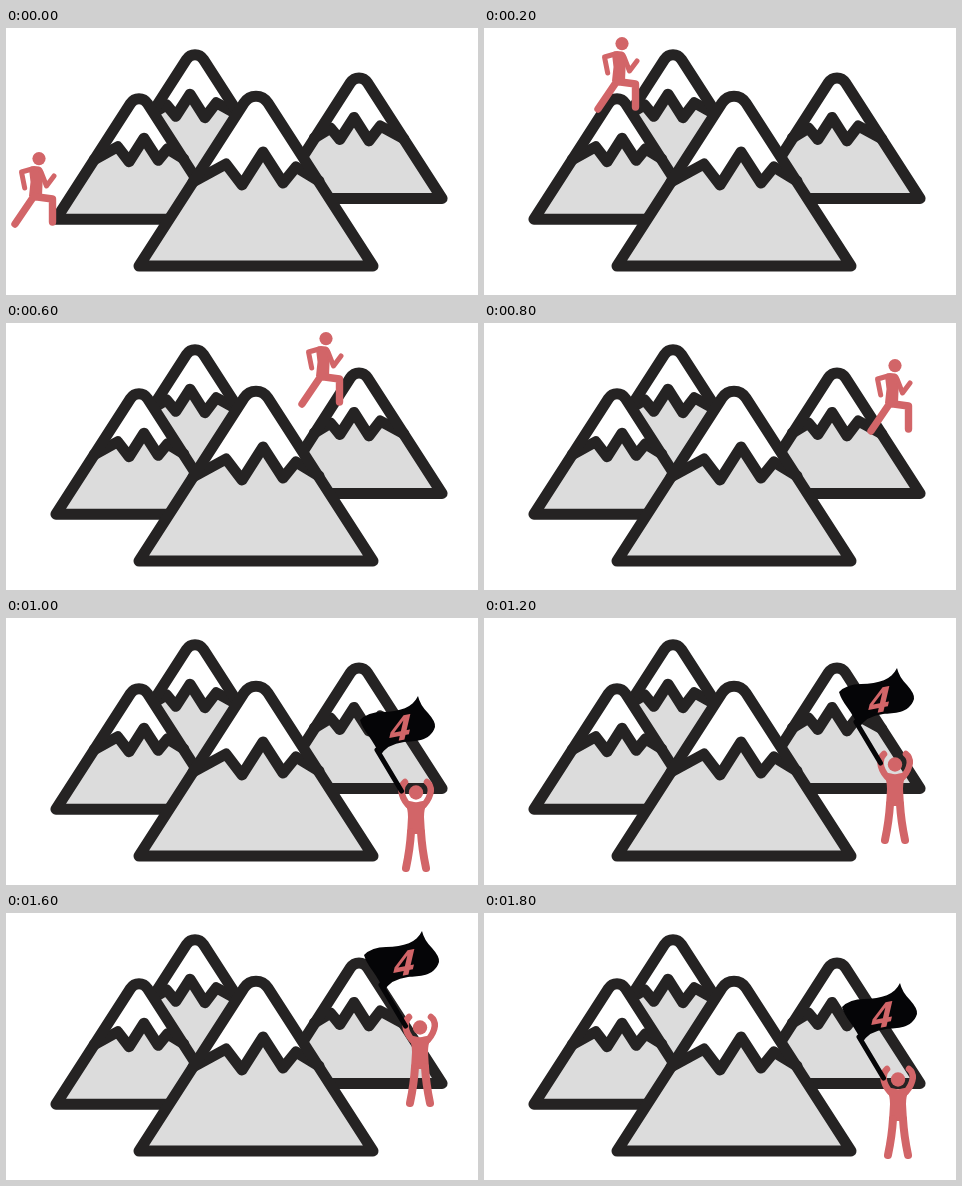
Write an HTML page that moves like this. It is 472 px wide and 267 px high and loops after 2 s.

```html
<!DOCTYPE html>
<html lang="en">
<head>
<meta charset="utf-8">
<title>Over the mountains</title>
<style>
  html, body { margin: 0; width: 100%; height: 100%; overflow: hidden; background: #fff; }
  svg { display: block; width: 100%; height: 100%; }
  .range { stroke: #252323; stroke-linejoin: round; stroke-linecap: round; fill: none; }
  .snow { fill: #fff; stroke: none; }
  .rock { fill: #dcdcdc; stroke: none; }
  .limb { fill: none; stroke: #d26568; stroke-linecap: round; stroke-linejoin: round; }
  .skin { fill: #d26568; }
  .four { font: bold 33px "DejaVu Sans", sans-serif; text-anchor: middle; }
  #runner { animation: run 2s step-end infinite; }
  #winner { animation: cheer 2s step-end infinite; }
  @keyframes run {
    0%  { transform: translate(0, 0); visibility: visible; }
    10% { transform: translate(105px, -115px); visibility: visible; }
    20% { transform: translate(213px, -120px); visibility: visible; }
    30% { transform: translate(287px, -115px); visibility: visible; }
    40% { transform: translate(378px, -88px); visibility: visible; }
    50%, 100% { transform: translate(378px, -88px); visibility: hidden; }
  }
  @keyframes cheer {
    0%  { transform: translate(0, 0); visibility: hidden; }
    50% { transform: translate(0, 0); visibility: visible; }
    60% { transform: translate(1px, -28px); visibility: visible; }
    70% { transform: translate(8px, -9px); visibility: visible; }
    80% { transform: translate(4px, -60px); visibility: visible; }
    90%, 100% { transform: translate(4px, -8px); visibility: visible; }
  }
</style>
</head>
<body>
<svg viewBox="0 0 472 267" preserveAspectRatio="none">
  <defs>
    <g id="peak">
      <path class="snow" d="M-117 170L-12 7C-6-2 6-2 12 7L117 170Z"/>
      <path class="rock" d="M-117 170L-63 86-30 68-14 89 7 56 27 87 40 71 63 85 117 170Z"/>
      <path d="M-63 86L-30 68-14 89 7 56 27 87 40 71 63 85"/>
      <path d="M-117 170L-12 7C-6-2 6-2 12 7L117 170Z"/>
    </g>
  </defs>

  <g class="range" stroke-width="15.5">
    <use href="#peak" transform="translate(189 26.5) scale(-.71 .71)"/>
    <use href="#peak" transform="translate(133 70.5) scale(.71)"/>
    <use href="#peak" transform="translate(353 49.7) scale(-.71 .71)"/>
  </g>
  <g class="range" stroke-width="11">
    <use href="#peak" transform="translate(250 68)"/>
  </g>

  <g id="runner">
    <circle class="skin" cx="33" cy="130.6" r="6.6"/>
    <path class="skin" d="M23 141Q24 138 28 138L33 138.5Q37 139.5 37 144L36 168Q30 174 23 168L24.5 154Z"/>
    <path class="limb" stroke-width="5" d="M26 141L15.5 144 18.7 160M35 144L40.5 158 48 148"/>
    <path class="limb" stroke-width="7.4" d="M28 168L9 196M28 168.5L46.5 171 46.5 194"/>
  </g>

  <g id="winner">
    <circle class="skin" cx="410" cy="174.5" r="7.2"/>
    <path class="limb" stroke-width="6.5" d="M399 164Q395.5 167 395.5 173Q396 180 402 187M421 164Q425 167 424.8 173Q424 180 418 187"/>
    <path class="skin" d="M399 185Q402 182 406 183.5Q410 185 414 183.5Q418 182 421 185Q418 191 418 199L419 216H401L402 199Q402 191 399 185Z"/>
    <path class="limb" stroke-width="8" d="M405 214Q404 231 400 250M415 214Q416 231 420 250"/>
    <path d="M371 132L395.5 173" stroke="#050507" stroke-width="5" stroke-linecap="round"/>
    <path fill="#050507" d="M354 102Q362 94 376 94C394 94 407 89 412 78Q414 87 422 95Q430 104 429 109C424 124 409 123 398 124Q381 126 374 138Q370 128 362 117Q356 109 354 102Z"/>
    <text class="four skin" transform="translate(395 110) rotate(-11) skewX(-24)" y="12">4</text>
  </g>
</svg>
</body>
</html>
```
